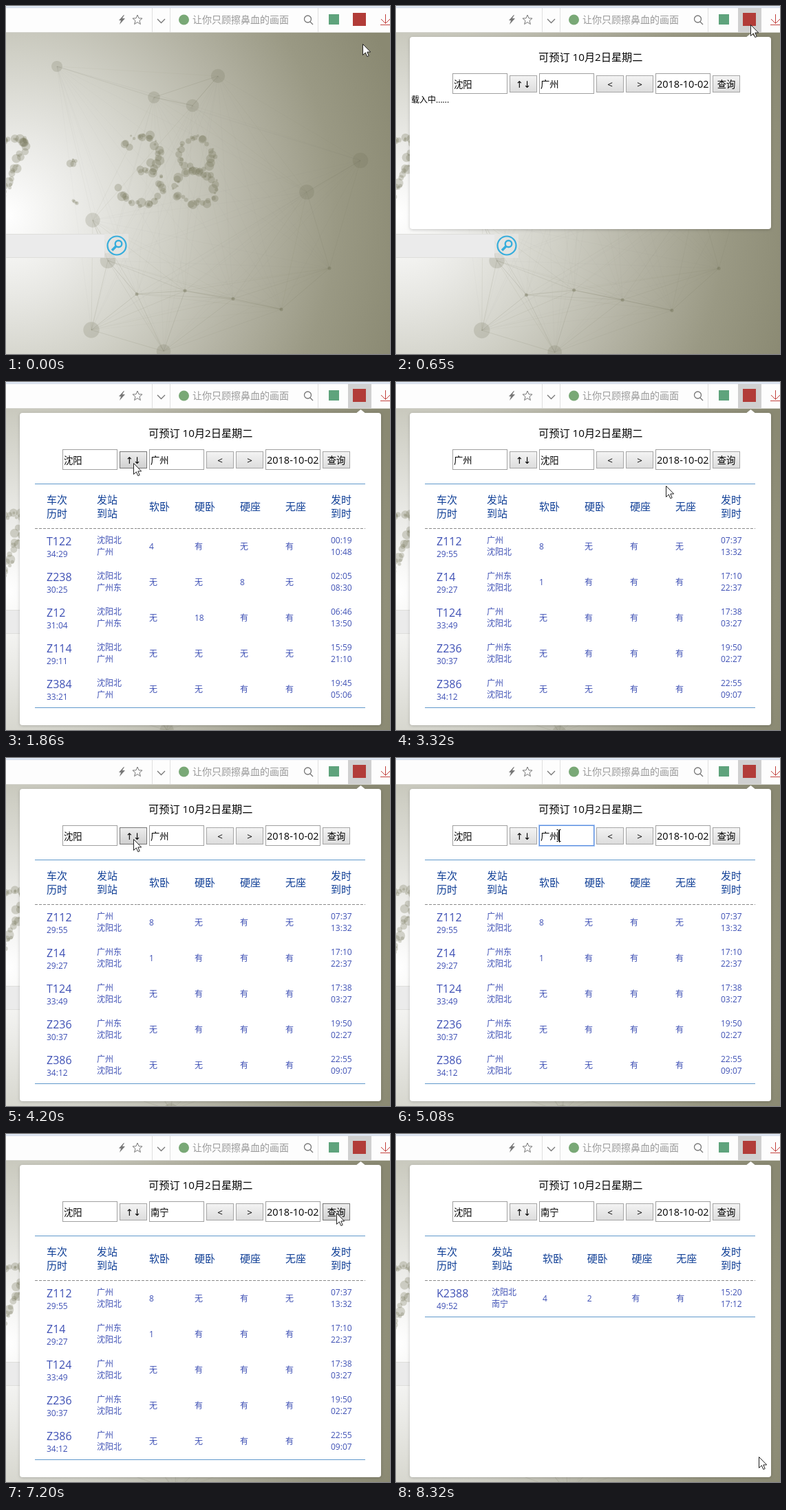
Write an HTML page with a canvas that moves like this. It is 558 px wide and 507 px high and loops after 8.44 s.

```html
<!DOCTYPE html>
<html lang="zh">
<meta charset="utf-8">
<title>车票查询</title>
<style>
html, body { margin: 0; width: 100%; height: 100%; overflow: hidden }
canvas { display: block }
</style>
<canvas id="stage" width="558" height="507"></canvas>
<script>
const c = document.getElementById('stage').getContext('2d');
const LOOP = 8440, STEP = LOOP / 76;
const FONT = '"Open Sans", "Noto Sans CJK SC", "Noto Sans CJK", sans-serif';

// ---------- helpers ----------
function text(s, x, mid, size, color, align = 'left', font = FONT) {
  c.font = size + 'px ' + font;
  c.fillStyle = color;
  c.textAlign = align;
  c.fillText(s, x, Math.round(mid + size * .37));
}
function rect(x, y, w, h, color) {
  c.fillStyle = color;
  c.fillRect(x, y, w, h);
}
function frame(x, y, w, h, color) {
  c.strokeStyle = color;
  c.lineWidth = 1;
  c.strokeRect(x + .5, y + .5, w - 1, h - 1);
}
function disc(x, y, r, color) {
  c.fillStyle = color;
  c.beginPath();
  c.arc(x, y, r, 0, 7);
  c.fill();
}
function ring(x, y, r, color, lw) {
  c.strokeStyle = color;
  c.lineWidth = lw;
  c.beginPath();
  c.arc(x, y, r, 0, 7);
  c.stroke();
}
function line(color, lw, ...p) {
  c.strokeStyle = color;
  c.lineWidth = lw;
  c.beginPath();
  for (let i = 0; i < p.length; i += 2) c.lineTo(p[i], p[i + 1]);
  c.stroke();
}
function path(d, x, y, fill, stroke) {
  c.save();
  c.translate(x, y);
  const p = new Path2D(d);
  if (fill) { c.fillStyle = fill; c.fill(p); }
  if (stroke) { c.strokeStyle = stroke; c.lineWidth = 1; c.stroke(p); }
  c.restore();
}
let seed = 7;
const rnd = () => (seed = seed * 16807 % 2147483647) / 2147483647;

// ---------- wallpaper ----------
const node = (x, y, r) => ({ x, y, r, vx: rnd() * 6 - 3, vy: rnd() * 6 - 3 });
const hubs = [[74, 88], [215, 133], [271, 145], [308, 102], [515, 225], [437, 271],
  [126, 312], [148, 371], [124, 472], [229, 503]];
const nodes = hubs.map(([x, y]) => node(x, y, 8 + rnd() * 4));
for (let i = 0; i < 5; i++) nodes.push(node(190 + 70 * i, 375 + rnd() * 120, 2.5));

const dots = [];
function scatter(n, at, size = 7) {
  for (let i = 0; i < n; i++) {
    const [x, y] = at(i / (n - 1));
    dots.push({ x: x + rnd() * 8 - 4, y: y + rnd() * 8 - 4, r: 1.5 + rnd() * (size - 1.5), p: rnd() * 6.3 });
  }
}
const arc = (x, y, rx, ry, a, b) => u =>
  [x + rx * Math.cos(a + (b - a) * u), y + ry * Math.sin(a + (b - a) * u)];
const circle = [-1.6, 4.6];
scatter(16, u => [-25 + 57 * u, 195]);
scatter(22, u => [29 - 34 * u, 195 + 88 * u]);
scatter(24, arc(197, 214, 25, 23, -2.7, 1.1));
scatter(30, arc(197, 263, 31, 25, -1.7, 2.9));
scatter(30, arc(276, 216, 25, 23, ...circle));
scatter(36, arc(276, 264, 30, 24, ...circle));
scatter(5, () => [98, 225]);
scatter(4, () => [100, 286], 3);

function wallpaper(t) {
  const g = c.createRadialGradient(0, 305, 0, 0, 305, 600);
  ['#fff', '#e8e8e4', '#cfcfc5', '#b4b3a4', '#9a9984', '#8a8972'].forEach((k, i) => g.addColorStop(i / 5, k));
  rect(0, 38, 558, 469, g);
  const s = t / 1000;
  const pts = nodes.map(n => [n.x + n.vx * s, n.y + n.vy * s, n.r]);
  pts.forEach(([x, y, r], i) => {
    for (const [u, v] of pts.slice(i + 1)) {
      const near = Math.max(0, 1 - Math.hypot(u - x, v - y) / 330);
      line(`rgba(112,112,88,${.25 * near * near + .03})`, 1, x, y, u, v);
    }
    disc(x, y, r, `rgba(112,112,85,${r < 5 ? .4 : .2})`);
  });
  for (const d of dots)
    disc(d.x + 1.5 * Math.sin(s * 2 + d.p), d.y + 1.5 * Math.cos(s * 1.7 + d.p), d.r, 'rgba(115,115,85,.28)');

  rect(0, 332, 143, 35, '#dededb');
  rect(0, 333, 143, 33, '#ebebeb');
  rect(143, 332, 35, 35, 'rgba(235,235,235,.5)');
  ring(161, 349, 13.5, '#36addc', 2.2);
  ring(163.5, 346.5, 4.8, '#36addc', 2.4);
  line('#36addc', 3.6, 160, 350, 154, 356);
}

// ---------- browser bar ----------
function toolbar(open) {
  rect(0, 0, 558, 38, '#fdfdfd');
  rect(0, 0, 558, 2, '#dfe8f5');
  rect(0, 2, 558, 1, '#d5dbe6');
  rect(0, 38, 558, 1, '#d3d3cd');
  for (const x of [212, 238, 453]) rect(x, 3, 1, 35, '#e0e0e0');
  path('M3 -7L-4 1H-1L-3 7L5 -2H1L4 -7Z', 168, 20, '#777');
  path('M0 -7L2 -2.2 7 -2 3 1.4 4.4 6.5 0 3.6 -4.4 6.5 -3 1.4 -7 -2 -2 -2.2Z', 191, 20, 0, '#777');
  line('#777', 1.3, 220, 19, 225.5, 24.5, 231, 19);
  disc(258.5, 20, 7.5, '#79a876');
  text('让你只顾擦鼻血的画面', 271, 20, 14, '#999');
  ring(438.5, 19, 5, '#777', 1.3);
  line('#777', 1.3, 442, 23, 446, 27);
  rect(469, 12, 15, 15, '#5fa37c');
  if (open) rect(497, 3, 34, 35, '#d0d0d0');
  rect(504, 10, 19, 19, '#b23c38');
  path('M7.5 0V13M1 7L7.5 13.5 14 7M0 15.5H14', 544, 12, 0, '#c2403c');
}

// ---------- ticket panel ----------
const HEAD = ['车次 历时', '发站 到站', '软卧', '硬卧', '硬座', '无座', '发时 到时'];
const INK = '#3f51b5', HEAD_INK = '#103f96', RULE = '#6199cb';

// Two name columns, then five evenly spaced ones.
function timetable(second, third, rows) {
  const pitch = (472 - third) / 4;
  return {
    cols: [59, second, ...HEAD.slice(2).map((_, i) => third + pitch * i)],
    rows: rows.trim().split('\n').map(r => r.trim().split(' '))
  };
}
const southbound = timetable(132, 208, `
  T122 34:29 沈阳北 广州 4 有 无 有 00:19 10:48
  Z238 30:25 沈阳北 广州东 无 无 8 无 02:05 08:30
  Z12 31:04 沈阳北 广州东 无 18 有 有 06:46 13:50
  Z114 29:11 沈阳北 广州 无 无 无 无 15:59 21:10
  Z384 33:21 沈阳北 广州 无 无 有 有 19:45 05:06`);
const northbound = timetable(132, 208, `
  Z112 29:55 广州 沈阳北 8 无 有 无 07:37 13:32
  Z14 29:27 广州东 沈阳北 1 有 有 有 17:10 22:37
  T124 33:49 广州 沈阳北 无 有 有 有 17:38 03:27
  Z236 30:37 广州东 沈阳北 无 有 有 有 19:50 02:27
  Z386 34:12 广州 沈阳北 无 无 有 有 22:55 09:07`);
const nanning = timetable(139, 213, 'K2388 49:52 沈阳北 南宁 4 2 有 有 15:20 17:12');

function table({ cols, rows }) {
  rect(42, 148, 480, 1, RULE);
  c.setLineDash([4, 2]);
  cols.forEach((x, i) => {
    const lines = HEAD[i].split(' ');
    lines.forEach((s, k) => text(s, x, 181 + 20 * (k - (lines.length - 1) / 2), 15, HEAD_INK));
    line('#8a8a8a', 1, x - 17, 213.5, i < 6 ? cols[i + 1] - 18 : 522, 213.5);
  });
  c.setLineDash([]);
  rows.forEach(([train, length, from, to, ...rest], k) => {
    const y = 240 + 52 * k;
    const pair = (col, a, b) => {
      text(a, cols[col], y - 9, 12, INK);
      text(b, cols[col], y + 8, 12, INK);
    };
    text(train, cols[0], y - 8, 16, INK);
    text(length, cols[0], y + 11, 12, INK);
    pair(1, from, to);
    rest.slice(0, 4).forEach((s, i) => text(s, cols[i + 2], y, 12, INK));
    pair(6, ...rest.slice(4));
  });
  rect(42, 214 + 52 * rows.length, 480, 1, RULE);
}

const fields = [82, 208, 377];
const inside = (m, x, w, y, h) => m.x >= x && m.x < x + w && m.y >= y && m.y < y + h;

function field(i, s, size, focus) {
  const x = fields[i];
  rect(x, 98, 80, 30, '#fff');
  frame(x, 98, 80, 30, focus ? '#5c8fe0' : '#a0a0a0');
  if (focus) frame(x - 1, 97, 82, 32, '#a9c6f2');
  text(s, x + 2, 114, size, '#000');
  if (focus) rect(x + 2 + Math.round(c.measureText(s).width), 105, 1, 18, '#000');
}
function button(x, s, mouse, font) {
  const hot = inside(mouse, x, 40, 101, 25);
  const g = c.createLinearGradient(0, 101, 0, 126);
  g.addColorStop(0, hot ? '#eee' : '#f4f4f4');
  g.addColorStop(1, hot ? '#cfcfcf' : '#dcdcdc');
  rect(x, 101, 40, 25, g);
  frame(x, 101, 40, 25, hot ? '#777' : '#a6a6a6');
  text(s, x + 20, 114, 13.33, '#000', 'center', font);
}

function panel(t, mouse) {
  const data = t < 770 ? null : t < 2780 ? southbound : t < 7400 ? northbound : nanning;
  c.save();
  c.shadowColor = 'rgba(0,0,0,.2)';
  c.shadowBlur = 4;
  c.shadowOffsetY = 1;
  c.fillStyle = '#fff';
  c.beginPath();
  c.roundRect(20, 45, 525, data ? 455 : 280, 4);
  c.fill();
  c.restore();
  path('M507 47L515.5 40 524 47Z', 0, 0, '#fff');

  text('可预订 10月2日星期二', 207, 74, 15.2, '#000');
  const swapped = t > 2000 && t < 4220;
  const to = swapped ? '沈阳' : t < 5440 ? '广州' : t < 5550 ? '广' : t < 5900 ? '' : '南宁';
  field(0, swapped ? '广州' : '沈阳', 13.33);
  field(1, to, 13.33, t > 5000 && t < 7100);
  field(2, '2018-10-02', 14.5);
  button(165, '↑↓', mouse, '"DejaVu Sans", sans-serif');
  button(291, '<', mouse);
  button(334, '>', mouse);
  button(460, '查询', mouse);
  if (data) table(data);
  else text('载入中......', 22, 137, 12, '#000');
}

// ---------- pointer ----------
const home = [518, 55], icon = [515, 27], swap = [185, 118], query = [480, 115],
  aside = [387, 153], city = [236, 113], corner = [527, 470];
const moves = [
  [0, 330, icon], [680, 1780, swap], [2110, 2600, query], [2890, 3400, aside], [3550, 4000, swap],
  [4450, 4900, city], [5800, 6300, swap], [6300, 7000, query], [7900, 8329, corner]
];
// Each move eases from wherever the previous one ended.
function pointerAt(t) {
  let [x, y] = home;
  for (const [from, to, [tx, ty]] of moves) {
    const u = Math.min(1, Math.max(0, (t - from) / (to - from)));
    const e = u * u * (3 - 2 * u);
    x += (tx - x) * e;
    y += (ty - y) * e;
  }
  return { x: Math.round(x), y: Math.round(y) };
}
function pointer(m, open) {
  if (open && fields.some(x => inside(m, x, 80, 98, 30)))
    path('M-2.5 -8.5H-.5L.5 -7.5 1.5 -8.5H3.5M.5 -7.5V7.5M-2.5 8.5H-.5L.5 7.5 1.5 8.5H3.5', m.x, m.y, 0, '#000');
  else
    path('M.5 .5V16.5L4.3 12.9 6.8 18.6 9.2 17.6 6.8 12H11.7Z', m.x, m.y, '#fff', '#222');
}

function draw(now) {
  const t = Math.floor((now % LOOP + 30) / STEP) % 76 * STEP;
  const mouse = pointerAt(t), open = t > 440;
  wallpaper(t);
  toolbar(open);
  if (open) panel(t, mouse);
  pointer(mouse, open);
}
const start = performance.now();
(function tick() {
  draw(performance.now() - start);
  requestAnimationFrame(tick);
})();
</script>
</html>
```
